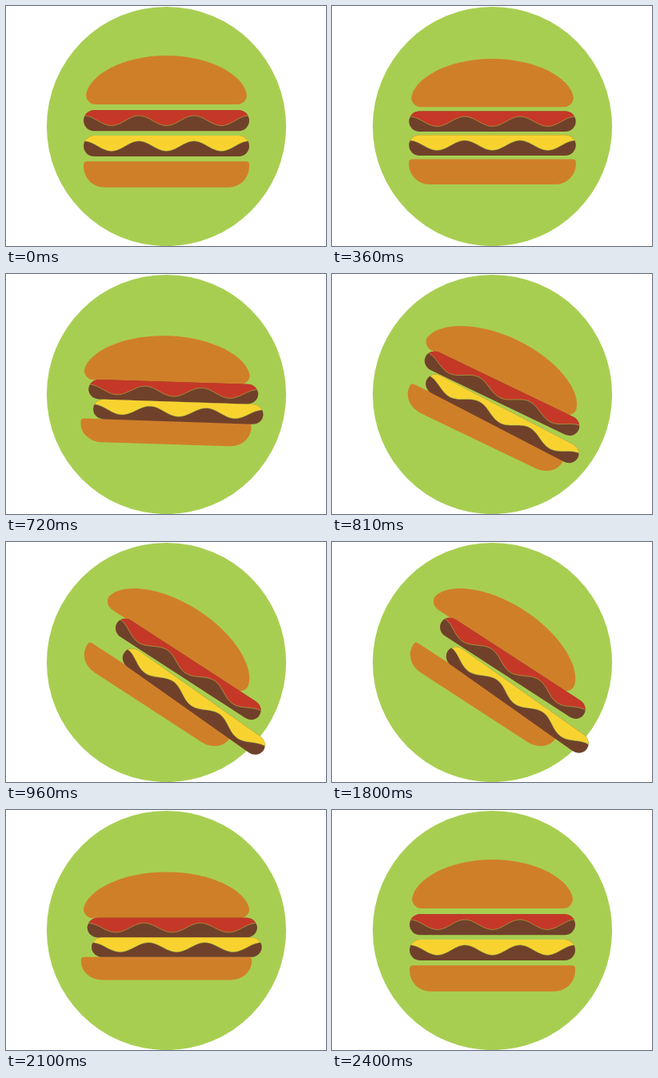
Animation of 400x300 px, one loop 2700 ms. Source, as an HTML page with a canvas:

```html
<!DOCTYPE html>
<html lang="en">
<head>
<meta charset="utf-8">
<title>Burger</title>
<style>
html, body { margin: 0; width: 100%; height: 100%; overflow: hidden; background: #fff; }
canvas { display: block; width: 400px; height: 300px; }
</style>
</head>
<body>
<canvas id="stage" width="400" height="300"></canvas>
<script>
const ctx = document.getElementById('stage').getContext('2d');
const LOOP = 2700, STEP = 30, MIRROR = 2730, MID = 200.5;
const GREEN = '#a8ce51', BUN = '#d07f29', MEAT = '#70412a', RED = '#c53827', YELLOW = '#f8d330';

const mix = (a, b, k) => a + (b - a) * k;
const span = (t, from, to) => Math.min(1, Math.max(0, (t - from) / (to - from)));
const quadOut = k => 1 - (1 - k) ** 2;
const sineOut = k => Math.sin(k * Math.PI / 2);
const quadInOut = k => k < 0.5 ? 2 * k * k : 1 - 2 * (1 - k) ** 2;
const elasticOut = k => k <= 0 ? 0 : k >= 1 ? 1
  : 2 ** (-10 * k) * Math.sin((k - 0.075) * 2 * Math.PI / 0.3) + 1;

function topBun() {
  ctx.beginPath();
  ctx.moveTo(-88.5, 30.5);
  ctx.arcTo(-100.5, 30.5, -100.5, 18.5, 12);
  ctx.bezierCurveTo(-97, -6, -55, -30.5, 0, -30.5);
  ctx.bezierCurveTo(55, -30.5, 97, -6, 100.5, 18.5);
  ctx.arcTo(100.5, 30.5, 88.5, 30.5, 12);
  ctx.closePath();
  ctx.fillStyle = BUN;
  ctx.fill();
}

function bottomBun() {
  ctx.beginPath();
  ctx.roundRect(-103.5, -16.3, 207, 32.6, [4, 4, 26, 26]);
  ctx.fillStyle = BUN;
  ctx.fill();
}

function wave() {
  ctx.beginPath();
  for (let x = -104; x <= 104; x += 2) ctx.lineTo(x, 6.2 * Math.cos(2 * Math.PI * x / 68.7));
}

// Meat below, wavy topping above, a hairline of background between them
function patty(topping) {
  ctx.beginPath();
  ctx.roundRect(-103.5, -13, 207, 26, 13);
  ctx.fillStyle = MEAT;
  ctx.fill();
  ctx.clip();
  wave();
  ctx.lineTo(104, -14);
  ctx.lineTo(-104, -14);
  ctx.closePath();
  ctx.fillStyle = topping;
  ctx.fill();
  wave();
  ctx.globalAlpha = 0.65;
  ctx.lineWidth = 0.8;
  ctx.strokeStyle = GREEN;
  ctx.stroke();
}

// y: resting, flat: squashed y, scale: squashed size, slip: sideways shift,
// turned / end: centre after the tilt and after the final slide
const parts = [
  { draw: topBun, y: 92.5, flat: 106, scale: [1.03, 0.95], slip: 0,
    turned: [225, 110], end: [225, 110], angle: 33 },
  { draw: bottomBun, y: 210.5, flat: 198.5, scale: [1.03, 0.89], slip: 0,
    turned: [185.7, 194.5], end: [185.7, 194.5], angle: 33 },
  { draw: () => patty(RED), y: 143.3, flat: 147, scale: [1.025, 0.945], slip: 8.6,
    turned: [213.5, 150], end: [227.75, 159], angle: 33 },
  { draw: () => patty(YELLOW), y: 175, flat: 171.6, scale: [1.027, 0.95], slip: 15.2,
    turned: [212, 183.5], end: [234.75, 199.5], angle: 35.2 }
];

function render(t) {
  const time = t < MIRROR - 960 ? t : MIRROR - t;
  const squash = elasticOut(span(time, 345, 945));
  const slip = quadOut(span(time, 430, 760));
  const turn = quadInOut(span(time, 690, 870));
  const slide = sineOut(span(time, 870, 960));
  // the wobble is settled by the time the tilt begins
  const press = time > 690 ? 1 : squash;

  ctx.fillStyle = '#fff';
  ctx.fillRect(0, 0, 400, 300);
  ctx.beginPath();
  ctx.arc(MID, 150.5, 149.6, 0, 2 * Math.PI);
  ctx.fillStyle = GREEN;
  ctx.fill();

  for (const p of parts) {
    const x = mix(mix(MID + p.slip * slip, p.turned[0], turn), p.end[0], slide);
    const y = mix(mix(mix(p.y, p.flat, press), p.turned[1], turn), p.end[1], slide);
    ctx.save();
    ctx.translate(x, y);
    ctx.rotate(p.angle * turn * Math.PI / 180);
    ctx.scale(mix(1, p.scale[0], press), mix(1, p.scale[1], press));
    p.draw();
    ctx.restore();
  }
}

const start = performance.now();
function tick() {
  const t = (performance.now() - start) % LOOP;
  render(Math.floor(t / STEP) * STEP);
  requestAnimationFrame(tick);
}
tick();
</script>
</body>
</html>
```
